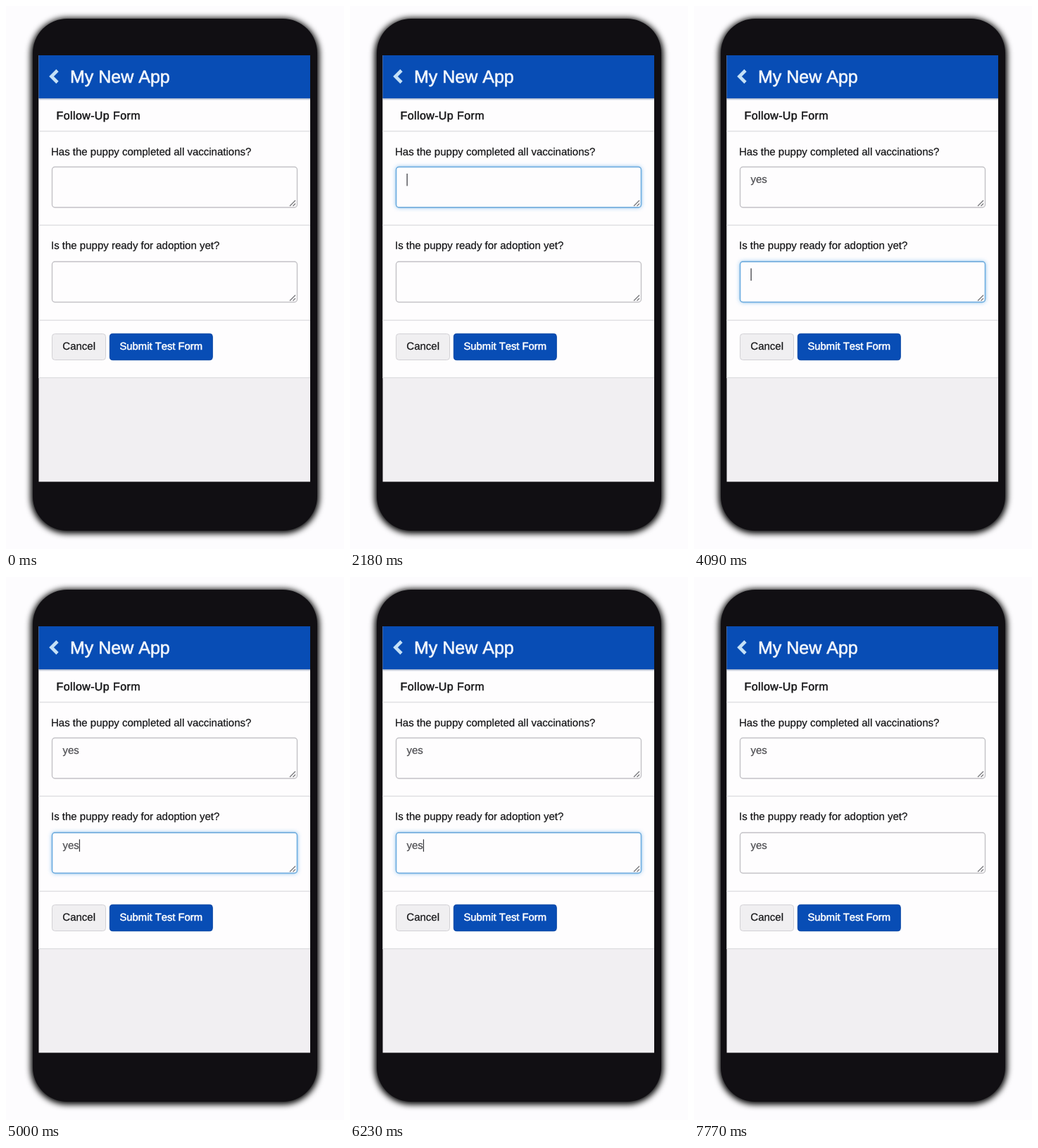
Recreate the animation shown at these times as an HTML page. Size 480x771 px, loop 7.81 s.

```html
<!DOCTYPE html>
<html lang="en">
<head>
<meta charset="utf-8">
<title>Follow-Up Form</title>
<style>
  html, body { margin: 0; width: 100%; height: 100%; overflow: hidden; background: #fdfcfe; }
  svg { display: block; width: 480px; height: 771px; }
  text {
    font: 15px "Liberation Sans", Arial, sans-serif; font-kerning: none; text-rendering: geometricPrecision;
    fill: #171719; stroke: #171719; stroke-width: .25px;
  }
  .title { font-size: 25px; fill: #f3f7fc; stroke: #f3f7fc; stroke-width: .6px; }
  .heading { font-size: 16px; letter-spacing: .4px; stroke-width: .5px; }
  .submit { font-size: 14.8px; fill: #fff; stroke: #fff; stroke-width: .5px; }
  .value { fill: #505054; stroke: #505054; }
  .rule { fill: #e1e1e4; }
  .box { fill: #fefdfe; stroke: #c3c2c6; stroke-width: 1.4; }
  .glow { fill: #66afe9; filter: url(#soft); }
  .ring { fill: none; stroke: #6cb0e6; stroke-width: 1.5; }
  .grip { stroke: #77777b; stroke-width: 1.3; }
  .caret { fill: #333338; }
</style>
</head>
<body>
<svg viewBox="0 0 480 771">
  <defs>
    <filter id="shade" x="-10%" y="-10%" width="120%" height="120%"><feGaussianBlur stdDeviation="4.500"/></filter>
    <filter id="soft" x="-10%" y="-40%" width="120%" height="180%"><feGaussianBlur stdDeviation="3"/></filter>
    <linearGradient id="drop" x2="0" y2="1">
      <stop stop-color="#57719e" stop-opacity=".6"/>
      <stop offset="1" stop-color="#57719e" stop-opacity="0"/>
    </linearGradient>
  </defs>

  <rect x="35" y="17" width="410" height="732" rx="52" filter="url(#shade)"/>
  <rect x="38" y="18" width="404" height="727" rx="49" fill="#110f13"/>
  <rect x="46.500" y="70" width="385.500" height="605.500" fill="#f1eff2"/>
  <rect x="46.500" y="131" width="385.500" height="397" fill="#fefdfe"/>
  <rect x="46.500" y="70" width="385.500" height="61" fill="#084db5"/>
  <rect x="46.500" y="131" width="385.500" height="3" fill="url(#drop)"/>
  <path d="M73 91.500 64.500 100l8.500 8.500" fill="none" stroke="#c4e0f6" stroke-width="4.700"/>
  <text class="title" x="91" y="109">My New App</text>
  <text class="heading" x="71.500" y="160.500">Follow-Up Form</text>
  <g class="rule">
    <rect x="46.500" y="177" width="385.500" height="1.500"/>
    <rect x="46.500" y="310.500" width="385.500" height="1.500"/>
    <rect x="46.500" y="445.500" width="385.500" height="1.500"/>
    <rect x="46.500" y="527" width="385.500" height="1.500"/>
  </g>
  <text x="64" y="211.700">Has the puppy completed all vaccinations?</text>
  <text x="64" y="345.200">Is the puppy ready for adoption yet?</text>

  <g id="fields"></g>

  <rect x="65.500" y="465.500" width="76" height="37" rx="4" fill="#f0eff1" stroke="#d2d1d5"/>
  <text x="80.300" y="488.300">Cancel</text>
  <rect id="submit" x="147.300" y="465.300" width="146" height="37.400" rx="4" stroke="#0946a4"/>
  <text class="submit" x="161.500" y="488.300">Submit Test Form</text>
</svg>
<script>
const LOOP = 7810, FADE = 150, BLINK = 500;
const HOVER = [5100, 5950];
const answer = 'yes';
const fields = [
  { y: 228.5, focus: 1950, blur: 3720, keys: [2600, 2800, 3020] },
  { y: 363, focus: 3720, blur: 6900, keys: [4400, 4600, 4820] }
];
const holder = document.getElementById('fields');
const submit = document.getElementById('submit');

for (const f of fields) {
  const g = document.createElementNS('http://www.w3.org/2000/svg', 'g');
  g.setAttribute('transform', `translate(65.5 ${f.y})`);
  const rect = name => `<rect class="${name}" width="348" height="57.5" rx="4"/>`;
  g.innerHTML = rect('glow') + rect('box') + rect('ring') +
    '<path class="grip" d="M337.5 55.5l8-8M342 55.5l3.5-3.5"/>' +
    '<text class="value" x="15" y="22.5"></text>' +
    '<rect class="caret" y="9.5" width="1.2" height="17.5"/>';
  holder.append(g);
  for (const name of ['glow', 'ring', 'value', 'caret']) f[name] = g.querySelector('.' + name);
}

const ramp = (t, start) => {
  const p = Math.min(1, Math.max(0, (t - start) / FADE));
  return p * p * (3 - 2 * p);
};

function draw(now) {
  const t = now % LOOP;
  for (const f of fields) {
    const typed = f.keys.filter(k => t >= k);
    const glow = ramp(t, f.focus) - ramp(t, f.blur);
    f.glow.style.opacity = glow * .85;
    f.ring.style.opacity = glow;
    f.value.textContent = answer.slice(0, typed.length);

    // Each keystroke restarts the caret's blink.
    const since = t - (typed.at(-1) ?? f.focus);
    const shown = t >= f.focus && t < f.blur && since % (2 * BLINK) < BLINK;
    f.caret.style.opacity = shown ? 1 : 0;
    const width = typed.length ? f.value.getComputedTextLength() : 0;
    f.caret.setAttribute('x', 15 + width);
  }
  submit.style.fill = t >= HOVER[0] && t < HOVER[1] ? '#04357f' : '#084db5';
  submit.style.stroke = t >= HOVER[0] && t < HOVER[1] ? '#042f72' : '#0946a4';
  requestAnimationFrame(draw);
}
requestAnimationFrame(draw);
</script>
</body>
</html>
```
